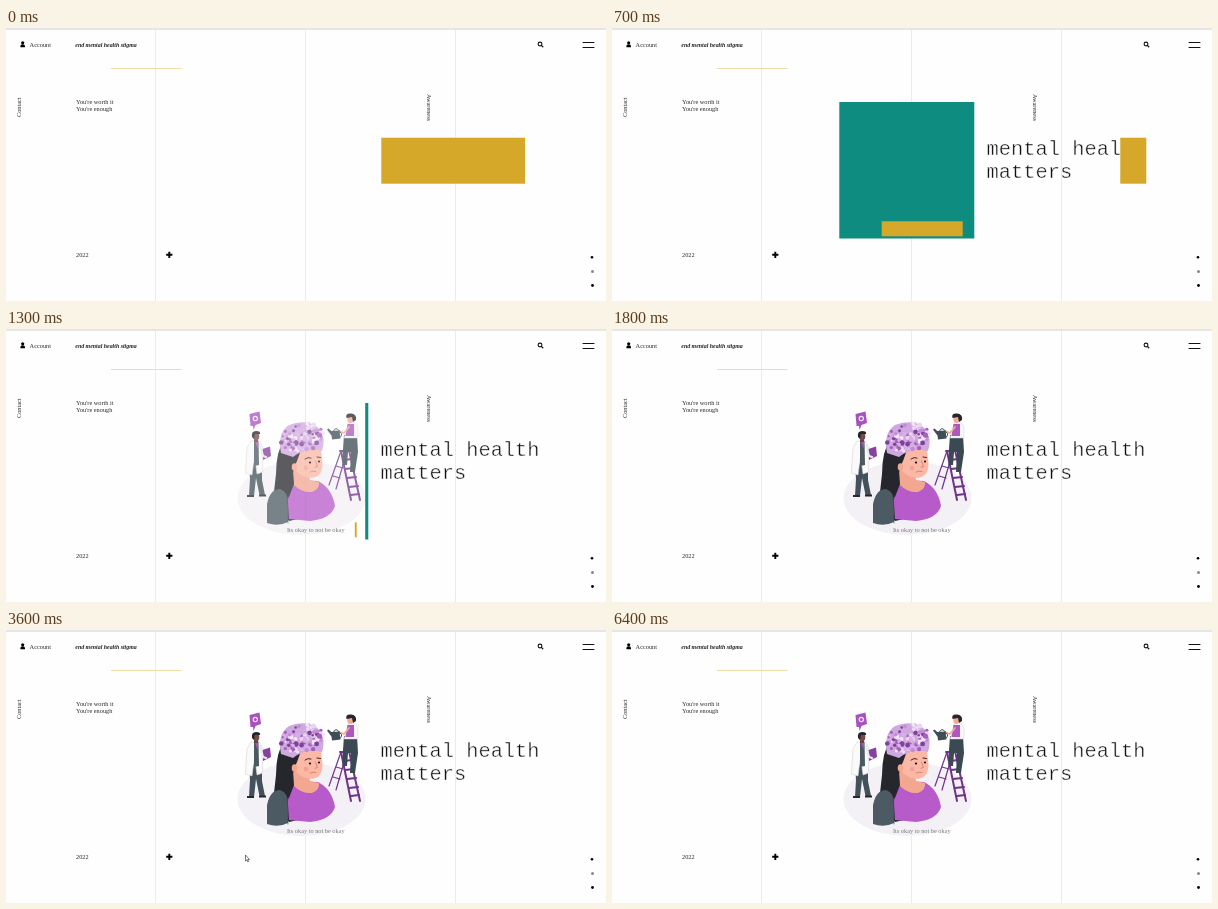
Write an HTML page that moves like this. It is 600 px wide and 273 px high and loops after 6.5 s.

```html
<!DOCTYPE html>
<html lang="en">
<head>
<meta charset="utf-8">
<title>End mental health stigma</title>
<style>
  html, body { margin: 0; width: 100%; height: 100%; overflow: hidden; background: #fefefe; }
  svg { display: block; width: 100vw; height: 100vh; }
  text { font: 6.3px "Liberation Serif", "Times New Roman", serif; fill: #2b2b2b; }
  .brand { font-size: 5.9px; font-weight: bold; font-style: italic; fill: #222; }
  #title text { font: 20.4px "Liberation Mono", "Courier New", monospace; fill: #111; stroke: #fefefe; stroke-width: .5; }
  #caption text { fill: #777; }
  .line { fill: none; stroke-linecap: round; stroke-linejoin: round; }
</style>
</head>
<body>
<svg viewBox="0 0 600 273">
  <path d="M0 1H600" stroke="#dedede" stroke-width="1.4"/>
  <path d="M149.5 2V273M299.5 2V273M449.5 2V273" stroke="#f0e9eb"/>
  <path d="M105 40.5H175.5" stroke="#efdcab"/>

  <!-- header and side labels -->
  <circle cx="16.7" cy="14.8" r="1.6"/>
  <path d="M14.4 19.2V18Q14.4 16.2 16.7 16.2T19 18V19.2Z"/>
  <text x="23.6" y="18.8">Account</text>
  <text class="brand" x="69.3" y="18.8">end mental health stigma</text>
  <g class="line" stroke="#111">
    <circle cx="534" cy="16" r="1.9" stroke-width="1.1"/>
    <path d="M535.6 17.6L536.8 18.8" stroke-width="1.3"/>
    <path d="M577 14.5H588M577 19.5H588" stroke-width="1"/>
  </g>
  <text x="70" y="76">You're worth it</text>
  <text x="70" y="83.3">You're enough</text>
  <text transform="translate(15 89) rotate(-90)">Contact</text>
  <text transform="translate(420.8 66) rotate(90)">Awareness</text>
  <text x="70" y="229">2022</text>
  <path d="M160.2 226.8H166.4M163.3 223.7V229.9" stroke="#000" stroke-width="1.9"/>
  <circle cx="586" cy="229.2" r="1.3"/>
  <circle cx="586.5" cy="243.5" r="1.5" fill="#888"/>
  <circle cx="586.5" cy="257.5" r="1.4"/>

  <g id="picture">
    <ellipse cx="295.5" cy="169" rx="64" ry="37" fill="#f4f1f6"/>

    <!-- speech bubble -->
    <path d="M243.5 85L253.5 82.5 255 94 249.5 96 247.5 101 247 97 244.5 97Z" fill="#a653bd"/>
    <circle class="line" cx="249.3" cy="89.5" r="2.1" stroke="#f3e4f7" stroke-width="1.2"/>

    <!-- doctor -->
    <path d="M243 134H256L256 151 259 166H253.5L250 149 248 167H243L244 150Z" fill="#43515a"/>
    <path d="M245 112L253 111.5 257 118 256.5 143 251 145 248.5 127 246 146 239.5 144 241 119Z" fill="#fafafa" stroke="#d5d1d8" stroke-width=".6"/>
    <path d="M248 112L252.5 112 253 136 248 137Z" fill="#4b5961"/>
    <path d="M249 112H252L251.5 120Z" fill="#ad58c1"/>
    <path d="M248 107H252V113H248Z" fill="#65403f"/>
    <ellipse cx="250.3" cy="107.3" rx="3" ry="4" fill="#754b48"/>
    <path d="M246 108Q245 102 250 102T254 105L249 105 248 110Z" fill="#25252b"/>
    <path d="M256.5 120L264 117.5 265 127 257 131Z" fill="#85419c"/>
    <path class="line" d="M254 116L257 127 260 128" stroke="#eee9f0" stroke-width="2.2"/>
    <path d="M241 166H248V168H241ZM253 165.5H260V167.5H253Z" fill="#28282f"/>

    <!-- ladder -->
    <g class="line" stroke="#6f3388" stroke-width="2">
      <path d="M335 122L323 156M341 122L330 160" stroke-width="1.2"/>
      <path d="M334 122H344M335 122L345 171M343 121L354 171" stroke-width="2"/>
      <path d="M338 131L346 130M339 140L348 139M341 149L350 148M343 158L352 157M345 166L353 165"/>
      <path d="M330 137L337 139M327 147L334 149" stroke-width="1.2"/>
    </g>

    <!-- gardener -->
    <path d="M338 106L351 106 352 123 349 143H344L345 123 342 123 341 136H336.5L337 120Z" fill="#3b4952"/>
    <path d="M342 94L349 93 352 98 352 109 338 109 341 100Z" fill="#f8f6f9" stroke="#d5d1d8" stroke-width=".5"/>
    <path d="M341.5 95L348 95 348 107 339.5 107Z" fill="#ad58c1"/>
    <ellipse cx="344.3" cy="90" rx="3" ry="4" fill="#f2aa93"/>
    <path d="M340.5 89Q339 84 345 84.5 351 85 350 91L347 93 346 88Z" fill="#26262d"/>
    <path class="line" d="M343 98L338 104 333 102" stroke="#f2aa93" stroke-width="1.8"/>
    <g transform="translate(-1.5)">
      <path d="M326.5 102L335 101.5 336 109.5 327.5 110.5ZM328 108L322.5 100.5 324 99.5 329 104Z" fill="#3f4d56"/>
      <path class="line" d="M329 102Q331 97 335 102M335 103Q339 104 336 108" stroke="#3f4d56"/>
    </g>

    <!-- woman -->
    <path d="M279 109Q270 122 270 145L267 172 283 192 292 190 304 155 292 116Z" fill="#26262d"/>
    <path d="M285 155Q297 151 312 152 326 159 329 177 325 190 304 192L283 190Q280 170 285 155Z" fill="#b75bcb"/>
    <path d="M288 140L303 145 304 151 313 153Q314 160 306 163 296 164 288 156 284 151 288 140Z" fill="#f4a790"/>
    <path d="M287 120Q300 114 315 121L316.5 134Q317 146 308 148.5 297 150 288 140Z" fill="#fab8a5"/>
    <path d="M277 121Q289 114 295 121L291 132 287 141 288 155 283 168 273 166Z" fill="#26262d"/>
    <ellipse cx="288.5" cy="138" rx="2.8" ry="3.8" fill="#f4a790"/>
    <path d="M261 175Q264 160 274 160 283 163 282 175V193Q272 198 261 194Z" fill="#4b5a63"/>
    <path d="M281 168Q283 180 282 194" class="line" stroke="#354149" stroke-width=".6"/>
    <g class="line" stroke="#42262c" stroke-width="1">
      <path d="M299 130Q302 127.5 305 129M311 128L314.5 128.5"/>
      <path d="M309.5 132L311.5 137.5 309 138.3M304 143Q307 141.5 310 142.5" stroke="#d4776a" stroke-width=".8"/>
    </g>
    <circle cx="304" cy="133.5" r="1.1"/><circle cx="313" cy="132.5" r="1"/>
    <circle cx="300" cy="139" r="2.2" fill="#f5a092"/>
    <path d="M275 124Q271 104 283 96 298 90 310 97 321 106 316 122 300 118 287 128Z" fill="#d0a8e0"/>
    <g id="flowers"></g>
  </g>

  <g id="caption"><text x="281" y="202.8">Its okay to not be okay</text></g>
  <g id="title">
    <text x="374.5" y="127">mental health</text>
    <text x="374.5" y="150">matters</text>
  </g>

  <rect id="pictureBlock" y="74" height="136.5" fill="#0e8c7f"/>
  <rect id="captionBlock" y="193.3" height="15" fill="#d5a82a"/>
  <rect id="titleBlock" y="109.7" height="46" fill="#d5a82a"/>

  <path id="cursor" d="M0 0V6L1.4 4.8 2.3 6.9 3.1 6.5 2.2 4.5H4Z" fill="#fff" stroke="#222" stroke-width=".6"/>
</svg>
<script>
const LOOP = 6500, STEP = 100, HALF = 735, FADE = 750;
const $ = id => document.getElementById(id);
const clamp = v => Math.min(1, Math.max(0, v));
const easeInOut = u => u < .5 ? 8 * u ** 4 : 1 - 8 * (1 - u) ** 4;

function growFlowers() {
  let seed = 11;
  const random = () => (seed = seed * 16807 % 2147483647) / 2147483647;
  const colours = ['#ead6f1', '#c48cd7', '#7f429a', '#d9b0e6', '#a35fba', '#f2e6f6'];
  let dots = '';
  for (let i = 0; i < 90; i++) {
    const angle = random() * 2 * Math.PI, reach = Math.sqrt(random());
    const x = 296 + 21 * reach * Math.cos(angle);
    const y = 109 + 14 * reach * Math.sin(angle) + (295 - x) * .12;
    dots += `<circle cx="${x}" cy="${y}" r="${1 + random() * 1.7}" fill="${colours[i % 6]}"/>`;
  }
  $('flowers').innerHTML = dots;
}

// A block wipes in from the left, then leaves to the right.
const reveals = [
  { name: 'title', x: 375.3, width: 159, start: -492 },
  { name: 'picture', x: 227.3, width: 135, start: 0 },
  { name: 'caption', x: 269.7, width: 81, start: 0 }
];

function drawReveal({ name, x, width, start }, time) {
  const grow = easeInOut(clamp((time - start) / HALF));
  const leave = easeInOut(clamp((time - start - HALF) / HALF));
  const block = $(name + 'Block');
  block.setAttribute('x', x + width * leave);
  block.setAttribute('width', width * (grow - leave));
  $(name).style.visibility = time >= start + HALF ? 'visible' : 'hidden';
}

// time, x, y
const cursorPath = [[3200, 51, 0], [3400, 178, 150], [3600, 239.5, 225], [3800, 263.5, 241], [4100, 272, 274]];

function drawCursor(time) {
  const i = cursorPath.findIndex(point => point[0] > time);
  $('cursor').style.visibility = i > 0 ? 'visible' : 'hidden';
  if (i < 1) return;
  const [t0, x0, y0] = cursorPath[i - 1], [t1, x1, y1] = cursorPath[i];
  const u = (time - t0) / (t1 - t0);
  $('cursor').setAttribute('transform', `translate(${x0 + (x1 - x0) * u} ${y0 + (y1 - y0) * u})`);
}

function draw(now) {
  const time = Math.floor((now + 5) / STEP) * STEP % LOOP;
  reveals.forEach(reveal => drawReveal(reveal, time));
  $('picture').style.opacity = clamp((time - HALF) / FADE);
  drawCursor(time);
  requestAnimationFrame(draw);
}

growFlowers();
draw(performance.now());
</script>
</body>
</html>
```
